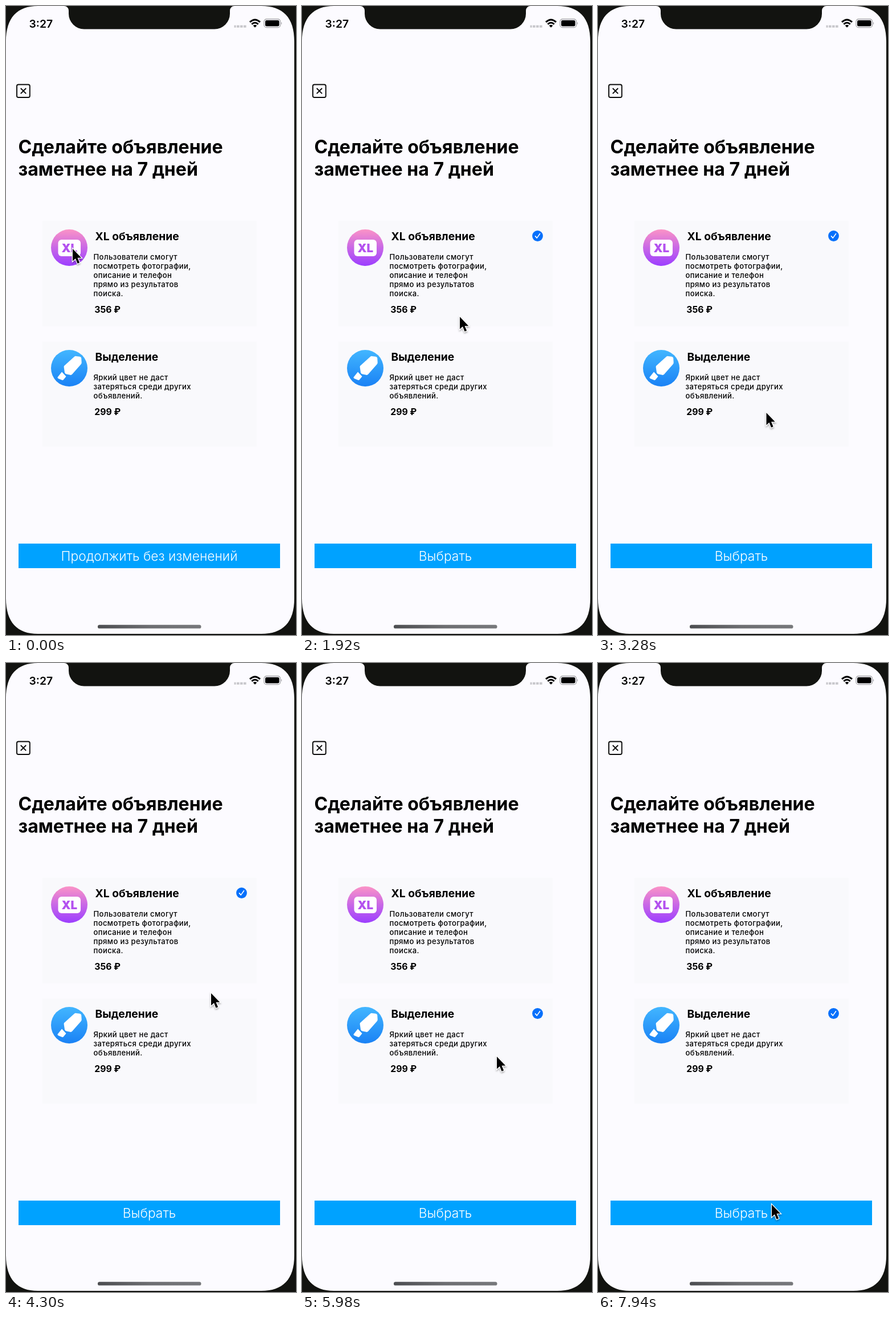
An HTML page for the animation above (8 s loop, 509 by 1101 pixels).

```html
<!DOCTYPE html>
<html lang="ru">
<head>
<meta charset="utf-8">
<title>Объявление</title>
<style>
  html, body { margin: 0; width: 100%; height: 100%; overflow: hidden; background: #121310; }
  svg { display: block; width: 509px; height: 1101px; font-family: Inter, "Noto Sans", sans-serif; }
  .title { font-size: 32.1px; font-weight: 700; }
  .name { font-size: 19.3px; font-weight: 700; }
  .body { font-size: 13.1px; font-weight: 450; letter-spacing: .36px; }
  .price { font-size: 15.8px; font-weight: 700; }
  .label { font-size: 22.8px; font-weight: 300; fill: #fff; text-anchor: middle; }
</style>
</head>
<body>
<svg viewBox="0 0 509 1101">
  <defs>
    <linearGradient id="pink" x2="0" y2="1">
      <stop stop-color="#fb93c6"/><stop offset=".5" stop-color="#c968e6"/><stop offset="1" stop-color="#9c3eff"/>
    </linearGradient>
    <linearGradient id="blue" x2="0" y2="1">
      <stop stop-color="#42b6ff"/><stop offset="1" stop-color="#1a82f5"/>
    </linearGradient>
    <linearGradient id="bar">
      <stop stop-color="#4c4d50"/><stop offset=".5" stop-color="#6d6e71"/><stop offset="1" stop-color="#77787b"/>
    </linearGradient>
    <filter id="shadow" x="-50%" y="-30%" width="200%" height="170%">
      <feDropShadow dx="0" dy="2" stdDeviation="1.5" flood-opacity=".35"/>
    </filter>
    <g id="check">
      <circle r="9.4" fill="#0570fb"/>
      <path d="M-4 .4L-1.2 3.6L4-3.8" fill="none" stroke="#fff" stroke-width="1.6" stroke-linecap="round" stroke-linejoin="round"/>
    </g>
  </defs>

  <!-- screen with notch -->
  <path fill="#fcfbff" d="M0 62C0 20 20 0 56 0H102A8 8 0 0 1 110 8V13.500A27 27 0 0 0 137 40.500H366A27 27 0 0 0 393 13.500V8A8 8 0 0 1 401 0H448C486 0 506 20 506 62V1037C506 1079 486 1099 448 1099H56C20 1099 0 1079 0 1037Z"/>

  <!-- status bar -->
  <text x="40.500" y="37.500" font-size="19.300" font-weight="600">3:27</text>
  <path d="M400.500 35.700h21.500" stroke="#c7c7cb" stroke-width="4" stroke-dasharray="4.600 1.400" stroke-dashoffset="1.500"/>
  <g fill="none" stroke="#000" stroke-width="3">
    <path d="M428 28.200Q437 19.800 446 28.200M431.300 31.800Q437 26.800 442.700 31.800"/>
  </g>
  <path d="M433.700 34.200Q437 31.600 440.300 34.200L437 37.800Z"/>
  <rect x="453" y="23" width="28.500" height="14.600" rx="4.200" fill="none" stroke="#a2a2a6" stroke-width="1.300"/>
  <rect x="455" y="25" width="24.500" height="10.600" rx="2.400"/>
  <path d="M483 27.800q2.400 2.500 0 5z" fill="#a2a2a6"/>

  <!-- close box -->
  <g fill="none" stroke="#0a0a0a" stroke-width="1.900">
    <rect x="19" y="137.500" width="22.800" height="22.500" rx="2.800"/>
    <path d="M25.800 144l9.400 9.400m0-9.400l-9.400 9.400"/>
  </g>

  <text class="title" x="21.500" y="257.700">Сделайте объявление</text>
  <text class="title" x="21.500" y="297">заметнее на 7 дней</text>

  <rect x="64" y="376" width="376" height="185" fill="#f9f9fc"/>
  <rect x="64" y="587.500" width="376" height="184" fill="#f9f9fc"/>
  <g id="cards"></g>

  <circle cx="111" cy="423" r="32" fill="url(#pink)"/>
  <rect x="91.500" y="409" width="39.500" height="29" rx="6" fill="#fff"/>
  <text x="111.300" y="430.700" font-size="20.500" font-weight="900" fill="#b452ef" text-anchor="middle">XL</text>

  <circle cx="111" cy="634" r="32" fill="url(#blue)"/>
  <g fill="#fff">
    <path d="M102.500 629.500L120 613.800Q121.300 612.700 123 612.900L129.500 613.800Q132 614.200 132.200 616.500L132.700 624Q132.800 625.700 131.700 627L116 644.800Q114.700 646.200 112.800 645.800L105.500 644.200Q103.400 643.700 103 641.500L101.600 632Q101.400 630.500 102.500 629.500Z"/>
    <path d="M98 640.500L105.500 648.500L101 654Q99.700 655.400 97.700 654.600L91.500 651.900Q89.700 650.900 91 649.200Z"/>
  </g>

  <use id="check1" href="#check" x="413.500" y="402.500"/>
  <use id="check2" href="#check" x="413.500" y="613.500"/>

  <rect x="22" y="941" width="459" height="43" fill="#00a2ff"/>
  <text id="skip" class="label" x="251.500" y="971">Продолжить без изменений</text>
  <text id="pick" class="label" x="251.500" y="971">Выбрать</text>

  <rect x="161" y="1083.200" width="181.500" height="6.400" rx="3.200" fill="url(#bar)"/>

  <g id="cursor">
    <path filter="url(#shadow)" d="M0 0V21.500L5 17L8.500 25.700L12.100 24.200L8.500 15.800H15.200Z" stroke="#fff" stroke-width="2.400" paint-order="stroke"/>
  </g>
</svg>
<script>
const $ = id => document.getElementById(id);
const LOOP = 8000;

const cards = [
  [410.3, 537, 'XL объявление', '356 ₽',
    ['Пользователи смогут', 'посмотреть фотографии,', 'описание и телефон', 'прямо из результатов', 'поиска.']],
  [621.3, 715.5, 'Выделение', '299 ₽',
    ['Яркий цвет не даст', 'затеряться среди других', 'объявлений.']]
];
const text = (kind, x, y, s) => `<text class="${kind}" x="${x}" y="${y}">${s}</text>`;
$('cards').innerHTML = cards.map(([y, priceY, name, price, lines]) =>
  text('name', 156.5, y, name) +
  lines.map((s, i) => text('body', 153.5, y + 33.6 + 16.1 * i, s)).join('') +
  text('price', 155.3, priceY, price)).join('');

// cursor path: time, x, y
const path = [
  [0, 117, 425], [280, 140, 446], [780, 146, 451], [940, 188.5, 484],
  [1920, 277, 544], [2700, 293, 640], [3280, 295.5, 712], [3700, 325, 660],
  [4300, 360, 578], [4860, 344, 672], [5300, 340, 686], [5980, 342, 689],
  [6640, 378, 735], [7380, 390, 873], [7940, 305, 948], [8000, 305, 948]
];

const slope = (i, k) => {
  const a = path[Math.max(i - 1, 0)], p = path[i], b = path[Math.min(i + 1, path.length - 1)];
  // flat at turning points so the path never overshoots
  if ((p[k] - a[k]) * (b[k] - p[k]) <= 0) return 0;
  const before = (p[k] - a[k]) / (p[0] - a[0]), after = (b[k] - p[k]) / (b[0] - p[0]);
  return 2 * before * after / (before + after);
};

function cursorAt(t) {
  let i = 0;
  while (i < path.length - 2 && t >= path[i + 1][0]) i++;
  const a = path[i], b = path[i + 1], d = b[0] - a[0], u = (t - a[0]) / d, v = 1 - u;
  return [1, 2].map(k =>
    v * v * ((1 + 2 * u) * a[k] + u * d * slope(i, k)) +
    u * u * ((3 - 2 * u) * b[k] - v * d * slope(i + 1, k)));
}

const show = (id, opacity) => $(id).setAttribute('opacity', opacity);
const ramp = (t, from, to) => Math.min(1, Math.max(0, (t - from) / (to - from)));

function draw(t) {
  show('check1', +(t >= 550 && t < 5250));
  show('check2', +(t >= 5250));
  show('skip', +(t < 550));
  show('pick', ramp(t, 1050, 1700));
  $('cursor').setAttribute('transform', `translate(${cursorAt(t)})`);
}

const start = performance.now();
function tick() {
  draw((performance.now() - start) % LOOP);
  requestAnimationFrame(tick);
}
tick();
</script>
</body>
</html>
```
